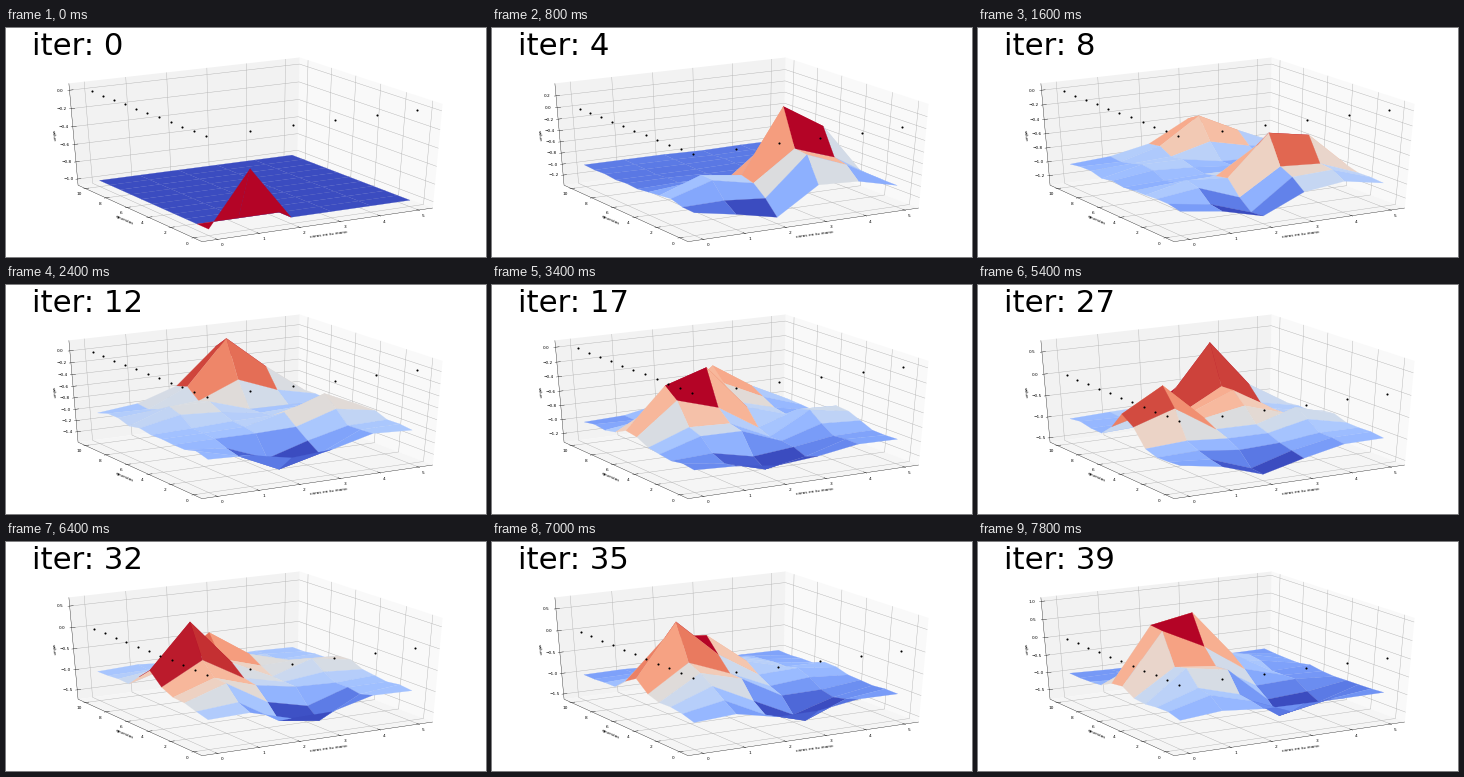
Animation of 480 by 229 pixels, one loop 8 s. Source, as a matplotlib script:

```python
import numpy as np
import matplotlib.pyplot as plt
from matplotlib.animation import FuncAnimation
from matplotlib.collections import LineCollection, PolyCollection

W, H, DPI = 480, 229, 100
FRAMES, INTERVAL = 40, 200
PX = 72 / DPI                # points per pixel
EDGE = 25 / 48               # half size of the panes, in axis lengths
DELTA = 1 / 12
HAIR = 0.34 * PX
SMALL = 4.3 * PX
ELEV, AZIM, DIST = np.radians(30), np.radians(-120), 10
CMAP = plt.get_cmap("coolwarm")

X, Y = np.meshgrid(np.arange(6), np.arange(11), indexing="ij")

# Main hills and dips (x, y, height over the resting level) by iteration
HILLS = {
    0: [(1, 0, .6)],
    4: [(3.3, 3, 1.62), (3.2, 1.2, .9), (1.2, 2.5, .45), (2, 0, -.35)],
    12: [(3.1, 9.3, 1.37), (4, 4, .4), (1.5, 7, .35), (2.2, 1.2, -.65)],
    22: [(2, 6.1, 1.65), (1.3, 5.6, 1.9), (1.5, 3.6, .8), (3, 7.5, .65),
         (4.4, 4.6, .5), (3.2, 4.4, -.4)],
    27: [(3, 8.1, 1.65), (.8, 4.8, 1.45), (2.9, 5.8, .85), (4, 4, .4),
         (2.1, .5, -.6)],
    32: [(1, 5, 1.55), (2, 7, 1), (1, 2.6, .6), (4.3, 5.3, .45),
         (2.6, 1.1, -.85)],
    39: [(2, 6, 1.95), (1.3, 5.5, 2.8), (1.4, 3.4, 1.6), (1.1, 1.6, .7),
         (3.2, 7.8, .6), (3.2, 2, -.7)],
}


def tent(d, width):
    return np.clip(1 - np.abs(d) / width, 0, 1)


def terrain(step):
    """Resting level, tent-shaped hills and dips, and a slight ripple."""
    spread = min(1, step / 4)
    parts = [h * tent(X - x, 1 + spread / 2) * tent(Y - y, 1 + spread)
             for x, y, h in HILLS[step]]
    ripple = np.random.default_rng(step).uniform(-1, 1, X.shape)
    top = np.maximum(np.max(parts, axis=0), 0)
    low = np.minimum(np.min(parts, axis=0), 0)
    return -1 + top + low + min(.04, .004 * step) * ripple


STEPS = sorted(HILLS)
SURFACES = np.array([terrain(s) for s in STEPS])


def heights(i):
    k = min(np.searchsorted(STEPS, i, side="right"), len(STEPS) - 1)
    t = (i - STEPS[k - 1]) / (STEPS[k] - STEPS[k - 1])
    return (1 - t) * SURFACES[k - 1] + t * SURFACES[k]


def project(px, py, pz):
    """Centred box coordinates to stage pixels and depth."""
    ce, se, ca, sa = np.cos(ELEV), np.sin(ELEV), np.cos(AZIM), np.sin(AZIM)
    u = -sa * px + ca * py
    v = -se * ca * px - se * sa * py + ce * pz
    depth = DIST - (ce * ca * px + ce * sa * py + se * pz)
    return 246.05 + 2557 * u / depth, 117.8 - 1140 * v / depth, depth


def path(*points):
    return [project(*p)[:2] for p in points]


def norm_x(x):
    return (x - 2.5) / 5.5


def norm_y(y):
    return (y - 5) / 11


def z_ticks(lo, hi):
    step = next(s for s in (.1, .2, .25, .5, 1) if s >= (hi - lo) / 9)
    first, last = int(np.ceil(lo / step)), int(np.floor(hi / step))
    digits = 2 if step == .25 else 1
    return [(k * step, f"{k * step:.{digits}f}".replace("-", "\u2212"))
            for k in range(first, last + 1)]


fig = plt.figure(figsize=(W / DPI, H / DPI), dpi=DPI, facecolor="white")
ax = fig.add_axes([0, 0, 1, 1])


def label(x, y, text, angle=0):
    ax.text(x, y, text, size=SMALL, ha="center", va="center",
            rotation=angle, rotation_mode="anchor", family="DejaVu Sans")


def draw_panes():
    e = EDGE
    walls = [path((e, -e, -e), (e, e, -e), (e, e, e), (e, -e, e)),
             path((-e, e, -e), (e, e, -e), (e, e, e), (-e, e, e)),
             path((-e, -e, -e), (e, -e, -e), (e, e, -e), (-e, e, -e))]
    ax.add_collection(PolyCollection(
        walls, facecolors=["0.975", "0.95", "0.9625"],
        edgecolors="none", zorder=1))


def draw_axes(norm_z, lo, hi):
    e, out, inn = EDGE, EDGE + .1 * DELTA, EDGE - .2 * DELTA
    grid, marks = [], [path((-e, -e, -e), (e, -e, -e)),
                       path((-e, -e, -e), (-e, e, -e)),
                       path((-e, e, -e), (-e, e, e))]
    for x in range(6):
        n = norm_x(x)
        grid.append(path((n, -e, -e), (n, e, -e), (n, e, e)))
        marks.append(path((n, -out, -e), (n, -inn, -e)))
        sx, sy, _ = project(n, -e, -e)
        label(sx + 4.5, sy + 5.9, str(x))
    for y in range(0, 11, 2):
        n = norm_y(y)
        grid.append(path((-e, n, -e), (e, n, -e), (e, n, e)))
        marks.append(path((-out, n, -e), (-inn, n, -e)))
        sx, sy, _ = project(-e, n, -e)
        label(sx - 6, sy + 5.9, str(y))
    for z, text in z_ticks(lo, hi):
        n = norm_z(z)
        grid.append(path((-e, e, n), (e, e, n), (e, -e, n)))
        marks.append(path((-out, e, n), (-inn, e, n)))
        sx, sy, _ = project(-e, e, n)
        label(sx - 9.3, sy + .4, text)
    ax.add_collection(LineCollection(grid, colors="#b0b0b0",
                                     linewidths=HAIR * 1.2, zorder=2))
    ax.add_collection(LineCollection(marks, colors="black",
                                     linewidths=HAIR, zorder=3))
    label(322.5, 206, "caras en tu mano", 7.6)
    label(118, 191.5, "apuestas", -24)
    label(46.5, 107, "value", -84.4)


def draw_surface(z, norm_z):
    sx, sy, depth = project(norm_x(X), norm_y(Y), norm_z(z))

    def corners(a):
        return np.stack([a[:-1, :-1], a[1:, :-1], a[1:, 1:], a[:-1, 1:]],
                        axis=-1).reshape(-1, 4)

    quads = np.stack([corners(sx), corners(sy)], axis=-1)
    mean = corners(z).mean(axis=1)
    colors = CMAP((mean - mean.min()) / np.ptp(mean))
    order = np.argsort(-corners(depth).mean(axis=1))
    ax.add_collection(PolyCollection(
        quads[order], facecolors=colors[order], edgecolors=colors[order],
        linewidths=.15, zorder=4))


def draw_dots(norm_z):
    xs = np.r_[np.zeros(11), np.arange(1, 6)]
    ys = np.r_[np.arange(11), np.zeros(5)]
    sx, sy, _ = project(norm_x(xs), norm_y(ys), norm_z(0))
    ax.scatter(sx, sy, s=(2.1 * PX) ** 2, c="black", linewidths=0, zorder=5)


def update(i):
    ax.cla()
    ax.axis("off")
    z = heights(i)
    low, high = min(z.min(), 0), max(z.max(), 0)
    pad = .05 * (high - low)
    lo, hi = low - pad, high + pad

    def norm_z(v):
        return (v - lo) / (hi - lo) - .5

    draw_panes()
    draw_axes(norm_z, lo, hi)
    draw_surface(z, norm_z)
    draw_dots(norm_z)
    ax.text(25.3, 26.4, f"iter: {i}", size=30.8 * PX, ha="left",
            va="baseline", family="DejaVu Sans")
    ax.set_xlim(-.5, W - .5)
    ax.set_ylim(H - .5, -.5)
    return []


anim = FuncAnimation(fig, update, frames=FRAMES, interval=INTERVAL,
                     init_func=lambda: [], repeat=True, repeat_delay=0)
plt.show()
```
